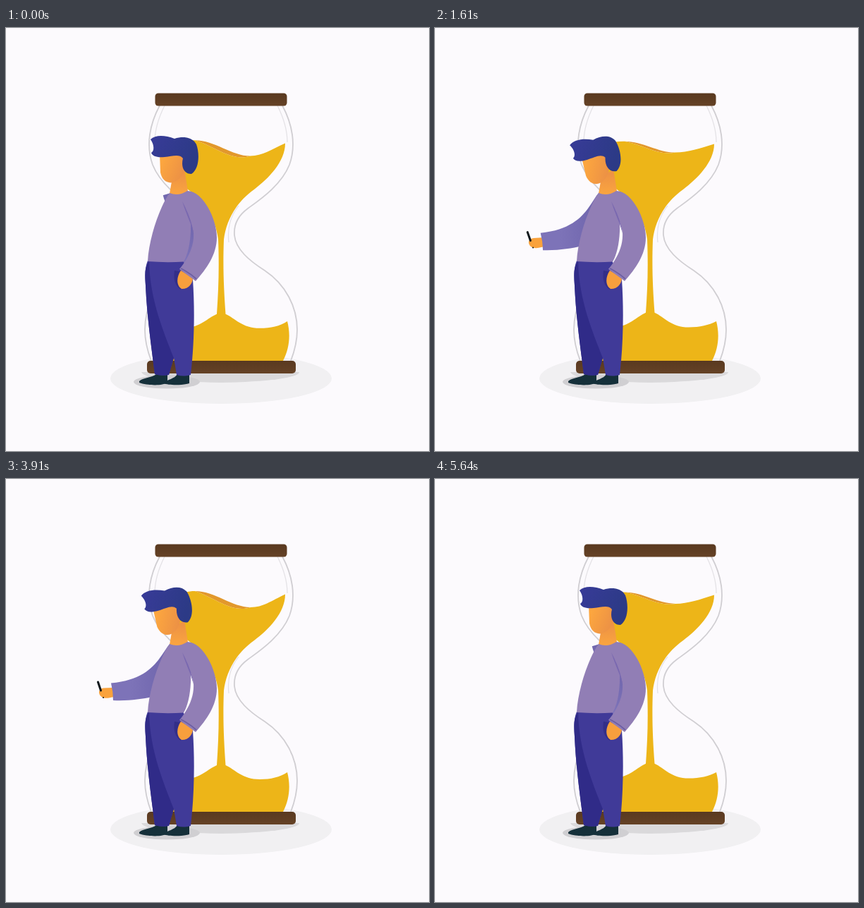
Animation of 600x600 px, one loop 5.67 s. Source, as an HTML page:

```html
<!DOCTYPE html>
<html lang="en">
<head>
<meta charset="utf-8">
<title>Waiting by the hourglass</title>
<style>
  html, body { margin: 0; width: 100%; height: 100%; overflow: hidden; background: #fcfafd; }
  svg { display: block; width: 100%; height: 100%; }
</style>
</head>
<body>
<svg viewBox="0 0 600 600">
  <defs>
    <linearGradient id="skin" x1="0" y1="0" x2="1" y2="0.5">
      <stop offset="0.2" stop-color="#fca63f"/><stop offset="1" stop-color="#ec9145"/>
    </linearGradient>
    <linearGradient id="neck" x1="0" y1="0" x2="0" y2="1">
      <stop offset="0.2" stop-color="#ee9344"/><stop offset="1" stop-color="#fba63f"/>
    </linearGradient>
    <linearGradient id="hair" x1="0" y1="0" x2="1" y2="0.4">
      <stop offset="0" stop-color="#383b98"/><stop offset="1" stop-color="#2c3a86"/>
    </linearGradient>
    <linearGradient id="sleeve" x1="0" y1="0" x2="1" y2="0">
      <stop offset="0.3" stop-color="#7d73b8"/><stop offset="0.75" stop-color="#7268af"/>
    </linearGradient>
    <linearGradient id="wood" x1="0" y1="0" x2="0" y2="1">
      <stop offset="0" stop-color="#593920"/><stop offset="1" stop-color="#654226"/>
    </linearGradient>
  </defs>

  <!-- ground -->
  <ellipse cx="305" cy="497" rx="157" ry="36" fill="#f1f0f2"/>
  <path d="M192 488H416C416 496 370 502 305 503C240 502 196 498 192 488Z" fill="#dad9db"/>
  <ellipse cx="228" cy="502" rx="47" ry="9.500" fill="#d0cfd2"/>

  <!-- hourglass -->
  <path id="ridge" fill="#e2982c"/>
  <path id="sand" fill="#edb518"/>
  <g fill="none" stroke="#d0ced2" stroke-width="1.800">
    <path id="glassRight" d="M392 110C406 136 412 166 402 194C390 224 358 245 343 256C328 267 323 281 324 294C326 314 345 330 367 344C397 364 413 396 413 428C413 443 409 459 404 472"/>
    <use href="#glassRight" transform="matrix(-1 0 0 1 610 0)"/>
    <g stroke="#e4e2e6" stroke-width="1.300">
      <path id="shineRight" d="M385 110C394 128 399 145 399 162M330 252C317 268 314 286 316 304"/>
      <use href="#shineRight" transform="matrix(-1 0 0 1 610 0)"/>
    </g>
  </g>
  <rect x="211.500" y="92.500" width="187" height="18" rx="4.500" fill="url(#wood)"/>
  <rect x="200" y="472" width="211" height="18" rx="5" fill="url(#wood)"/>

  <!-- raised arm, behind the body -->
  <g id="arm">
    <path d="M151 296L139 296.500C133 297 131 301 132.500 305C134 310 140 311.500 146 310.500L153 309Z" fill="#f9a23c"/>
    <path d="M130.500 288L134.500 300" stroke="#10171c" stroke-width="3" stroke-linecap="round"/>
    <circle cx="138" cy="310" r="1" fill="#10171c"/>
    <path d="M233 233C218 250 210 284 149 289.500Q152 302 152 314C175 315 192 312 208 309L232 300L242 240Z" fill="url(#sleeve)"/>
  </g>

  <!-- legs -->
  <path d="M189 501C194 496 207 496 213 491H229V503C222 508 199 507 189 503Z" fill="#15303a"/>
  <path d="M223 504C229 498 239 498 243 491H260V504C251 507 231 507 223 504Z" fill="#15303a"/>
  <path d="M201 330H251L265 357C268 400 267 450 262 492Q252 495 242 492L238 468L231 492Q220 494 211 491C206 450 200 410 198 365C197 350 197 340 201 330Z" fill="#403a98"/>
  <path d="M203 331C196 338 197 352 198 365C200 410 206 450 211 491Q220 494 231 492L238 468C224 432 204 386 203 331Z" fill="#302b88"/>
  <path d="M239 344C237 356 240 366 248 371L250 346Z" fill="#332e88"/>

  <!-- body and near arm -->
  <path d="M236 212L232 235C240 240 251 238 258 231L253 200Z" fill="url(#neck)"/>
  <path d="M232 234Q245 239 257 231L268 262L262 275C263 298 259 320 252 331.500Q226 333 201 331C203 296 219 252 232 234Z" fill="#917eb5"/>
  <path d="M248 344L265 354C265 364 257 371 249 370C242 366 241 354 248 344Z" fill="#f79f3d"/>
  <path d="M257 231C280 231 299 272 299 297C299 322 284 342 269 359L246 342C259 326 267 309 266 291Q265 280 252 250Z" fill="#917eb5"/>
  <path d="M250 246Q256 264 262 278L266 291Q263 270 250 246Z" fill="#7968b0"/>
  <path d="M248 341Q260 347 270 356" fill="none" stroke="#6b5ea5" stroke-width="1.800"/>

  <g id="head">
    <path d="M218 178L219 205C221 215 228 221 237 219C247 216 253 206 255 195L250 174Z" fill="url(#skin)"/>
    <path d="M205 158C212 151 226 152 239 157C252 153 265 155 270 165C275 179 274 200 263 207C252 207 248 196 251 185C246 178 236 182 225 183C214 184 208 182 206 177C211 174 210 165 205 158Z" fill="url(#hair)"/>
  </g>
</svg>
<script>
const LOOP = 5670;
const SAND_PERIOD = 2010;
const SAND_CREST = 3930;

// [time in ms, degrees below the raised pose]
const ARM = [[0, 55], [580, 45], [1000, 24.5], [1150, 15], [1680, 0.5], [2330, 2.7],
  [3090, 1.3], [3910, 0], [4480, 12.7], [4610, 17], [5180, 39.5], [LOOP, 55]];
// [time in ms, amount of nod]
const NOD = [[0, 0], [350, 0.05], [1000, 0.5], [1700, 1], [3650, 1], [3910, 0.94],
  [4480, 0.5], [5250, 0.03], [LOOP, 0]];

const el = id => document.getElementById(id);
const [arm, head, sand, ridge] = ['arm', 'head', 'sand', 'ridge'].map(el);

function slope(keys, i) {
  const a = keys[i - 1], b = keys[i], c = keys[i + 1];
  if (!a || !c || (b[1] - a[1]) * (c[1] - b[1]) <= 0) return 0;
  return (c[1] - a[1]) / (c[0] - a[0]);
}

// Smooth curve through the keys, flat at turning points.
function sample(keys, t) {
  const i = keys.findIndex((k, n) => n && t <= k[0]);
  const [t0, v0] = keys[i - 1], [t1, v1] = keys[i];
  const d = t1 - t0, u = (t - t0) / d, w = 1 - u;
  return v0 * w * w * (1 + 2 * u) + v1 * u * u * (3 - 2 * u)
    + d * u * w * (w * slope(keys, i - 1) - u * slope(keys, i));
}

function drawSand(t) {
  const phase = 2 * Math.PI * (t - SAND_CREST) / SAND_PERIOD;
  const wave = Math.cos(phase);
  const sag = 1.4 * Math.max(0, 13 * (wave - 0.5), -4 * Math.sin(phase));
  const left = 163 + 7 * wave, hump = 163 - 4 * wave;
  const midX = 333 + 14 * wave, mid = 169.5 + 12.5 * wave;
  const right = 166 - 2.5 * wave;
  const peak = 400.5 + 5.5 * wave, dip = 422.5 + 3.5 * wave;
  const a = 296, b = midX - 26;

  ridge.setAttribute('d', `M268 ${hump}C${a} ${hump} ${b} ${mid} ${midX} ${mid}
    C${b} ${mid + sag} ${a} ${hump + sag} 268 ${hump}Z`);
  sand.setAttribute('d', `M216 ${left}C232 ${left} 248 ${hump} 268 ${hump}
    C${a} ${hump + sag} ${b} ${mid + sag} ${midX} ${mid}
    C${midX + 18} ${mid} 376 ${(mid + right) / 2} 396 ${right}
    C396 190 372 214 352 229C325 248 312 275 309 300
    C307.5 340 309 370 311.5 ${peak}
    C325 ${peak + 6} 335 ${dip} 360 ${dip}C376 ${dip} 388 ${dip - 3} 399 416
    C404 435 402 455 393 472H226V${dip}H250
    C275 ${dip} 285 ${peak + 6} 299 ${peak}
    C301.500 370 302.500 340 301 300C298 275 285 248 258 229
    C238 214 216 190 216 ${left}Z`);
}

function draw(now) {
  const t = now % LOOP;
  arm.setAttribute('transform', `rotate(${-sample(ARM, t)} 232 245)`);
  head.setAttribute('transform', `rotate(${-11.5 * sample(NOD, t)} 240 232)`);
  drawSand(t);
}

const start = performance.now();
function tick() {
  draw(performance.now() - start);
  requestAnimationFrame(tick);
}
tick();
</script>
</body>
</html>
```
